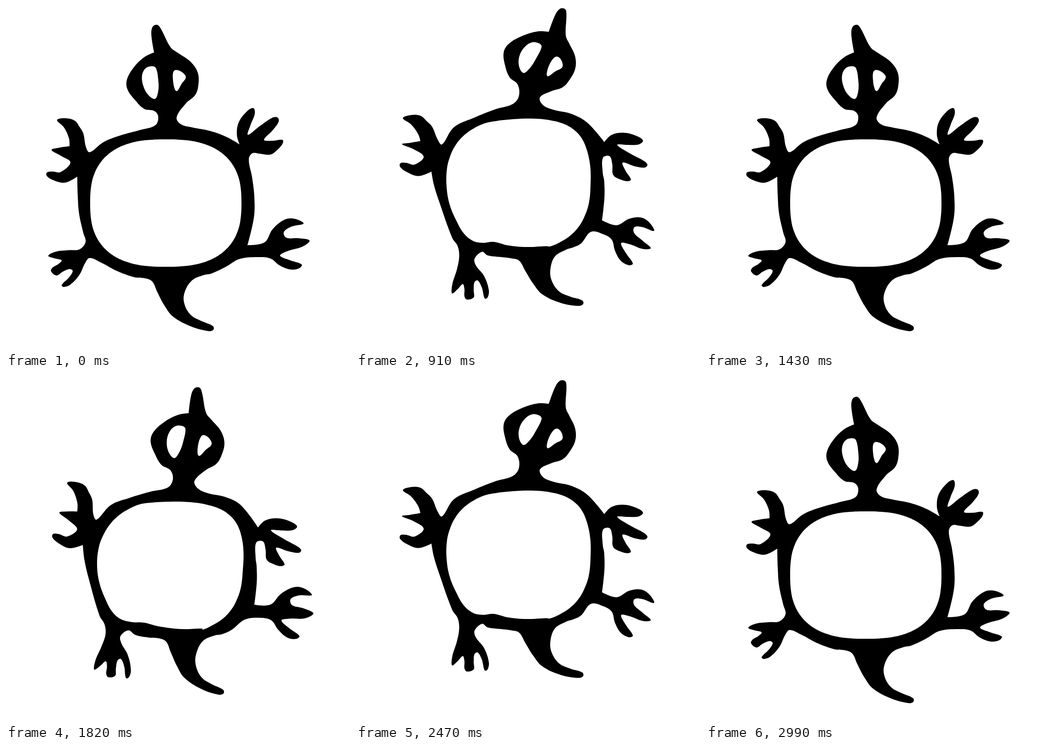
Animation of 748 by 748 pixels, one loop 3120 ms. Source, as an HTML page:

```html
<!DOCTYPE html>
<html lang="en">
<head>
<meta charset="utf-8">
<title>Turtle</title>
<style>
html, body { margin: 0; width: 100%; height: 100%; overflow: hidden; background: #fff; }
svg { display: block; width: 100vw; height: 100vh; }
</style>
</head>
<body>
<svg viewBox="0 0 748 748"><path id="turtle" fill-rule="evenodd"/></svg>
<script>
const STEP = 130, LAST = 5;

// The turtle is drawn once at rest. "a>b>c" pins a point: it moves from a to b (middle)
// and c (stretched), and the unpinned points follow. "!" marks a sharp corner.
const parse = text => text.trim().split(/\s+/).map(word => ({
  keys: word.replace('!', '').split('>').map(p => p.split(',').map(Number)),
  sharp: word.includes('!')
}));

const head = parse(`325,259>352,238>341,213 331,240 322,228 301,224>338,189>334,155 281,205 264,181
  263,160 279,132 301,111 322,101! 316,62 319,45 329,41>421,21>455,7 337,50 358,90 374,102
  401,121 417,145 418,174 411,194>457,187>449,177 391,212 371,242 380,257>417,240>406,215`);

const rightHand = parse(`508,301!>548,325>540,296 502,280 506,253 524,229 538,222>633,323>624,293
  541,234 532,258 526,280 552,261 579,243 590,242 593,251 580,270 561,291 579,293 601,291
  602,298>600,409>592,381 592,311 575,323 551,321 536,320 528,333>544,358>537,330`);

const rightFoot = parse(`525,520!>540,493>535,466 562,514 580,485 607,464 629,463
  647,473>665,472>648,489 620,480 604,492 610,504 636,505 660,510 645,523 612,533 596,543 618,553
  643,562>638,561>602,560 638,570 619,573 595,564 575,549>577,527>556,508 548,546
  508,550>520,525>511,491`);

const tail = parse(`446,582>470,557>472,525 430,585 404,597 388,624 388,648 402,672 425,685 450,696
  451,704>473,686>494,648 441,707 403,697 364,676 345,652 329,622 318,599>348,573>355,554`);

const leftFoot = parse(`182,548>249,561>258,549 172,559 160,584 141,605 126,611>267,651>286,634
  121,607 138,589 145,576 138,572 123,578 110,586 98,577 101,569 114,561 121,553 107,549
  92,543>192,634>209,625 109,534 136,531 160,529 173,513>214,535>221,522`);

const leftHand = parse(`155,371!>167,363>164,360 129,384 106,380 89,370>101,347>96,350 89,362
  101,360 119,361 140,340 120,326 99,313 116,308 138,305! 137,288 126,264
  111,248>133,228>102,244 127,244 149,249 160,263 168,277 174,307 182,318>197,308>187,301`);

const eyes = [
  '318,131 326,135 331,160 331,185 324,202 309,193 298,172 296,150 304,135',
  '370,139 383,144 391,155 382,169 372,185 367,181 363,160 364,143'
].map(parse);

// The hole in the shell is a superellipse, pinned at a few of its points.
const RING = 32;
const ringPins = {
  0: '515,417>510,389', 4: '468,526>465,500', 8: '384,546>370,524', 10: '300,532>300,513',
  12: '249,524>255,511', 16: '198,405>197,393', 20: '245,299>233,283', 24: '355,269>343,246',
  28: '487,299>475,270'
};
const bulge = v => Math.sign(v) * Math.abs(v) ** 0.78;
const shell = parse(Array.from({ length: RING }, (_, i) => {
  const a = i / RING * 2 * Math.PI;
  const x = 347.5 + 164.5 * bulge(Math.cos(a)), y = 428.5 + 138.5 * bulge(Math.sin(a));
  return `${x},${y}` + (ringPins[i] ? '>' + ringPins[i] : '');
}).join(' '));

const spin = ([x, y], a) => [x * Math.cos(a) - y * Math.sin(a), x * Math.sin(a) + y * Math.cos(a)];
const add = (p, q) => [p[0] + q[0], p[1] + q[1]];
const sub = (p, q) => [p[0] - q[0], p[1] - q[1]];
const mix = (p, q, t) => p.map((c, i) => c + (q[i] - c) * t);

// Best rigid move of one set of points onto another: both centers and the turn.
function fit(from, to, weights = from.map(() => 1)) {
  const total = weights.reduce((s, w) => s + w);
  const center = pts => [0, 1].map(k => pts.reduce((s, p, i) => s + p[k] * weights[i], 0) / total);
  const a = center(from), b = center(to);
  let dot = 0, cross = 0;
  from.forEach((p, i) => {
    const u = sub(p, a), v = sub(to[i], b);
    dot += weights[i] * (u[0] * v[0] + u[1] * v[1]);
    cross += weights[i] * (u[0] * v[1] - u[1] * v[0]);
  });
  return { a, b, turn: Math.atan2(cross, dot) };
}

const pinsOf = pts => pts.filter(p => p.keys.length > 1);

// Moves a point rigidly with the pins, the near ones counting most.
function follow(p, pins, key) {
  const rest = pins.map(pin => pin.keys[0]);
  const weights = rest.map(r => (Math.hypot(...sub(r, p)) ** 2 + 0.001) ** -2);
  const { a, b, turn } = fit(rest, pins.map(pin => pin.keys[key]), weights);
  return add(b, spin(sub(p, a), turn));
}

const rig = (pts, pins = pinsOf(pts)) => ({
  sharp: pts.map(p => p.sharp),
  poses: [0, 1, 2].map(key => pts.map(p => key ? follow(p.keys[0], pins, key) : p.keys[0]))
});

// Blends two poses of a part, turning it as a whole so that it keeps its size.
function blend(from, to, t) {
  const { a, b, turn } = fit(from, to);
  return from.map((p, i) =>
    add(mix(a, b, t), spin(mix(sub(p, a), spin(sub(to[i], b), -turn), t), turn * t)));
}

const posed = ({ poses }, n) => n <= 2
  ? blend(poses[0], poses[1], n / 2)
  : blend(poses[1], poses[2], (n - 2) / 2);

// Stretches of the shell's edge follow the hole and the joints of the limbs.
const limbs = [head, rightHand, rightFoot, tail, leftFoot, leftHand];
const joints = limbs.flatMap(limb => [limb[0], limb[limb.length - 1]]);
const edges = [
  '405,264 445,272 480,285>510,276>502,253',
  '535,372 540,415 539,460',
  '478,567',
  '302,592 280,590 243,577 207,558',
  '168,493 159,452 156,412',
  '212,296 247,282 290,270'
].map(parse);
const frame = [...pinsOf(shell), ...joints, ...edges.flatMap(pinsOf)];

const loops = [
  limbs.flatMap((limb, i) => [rig(limb), rig(edges[i], frame)]),
  [rig(shell)],
  ...eyes.map(eye => [rig(eye, pinsOf(head))])
];

// Closed smooth curve; handles shorten where the line turns and vanish at corners.
function curve(pts, sharp) {
  const n = pts.length, at = i => pts[(i + n) % n];
  const handle = (i, side) => {
    const p = at(i - 1), q = at(i), r = at(i + 1);
    if (sharp[i % n]) return q;
    const before = Math.hypot(...sub(q, p)), after = Math.hypot(...sub(r, q));
    const k = 0.37 * side * (side > 0 ? after : before) / (before + after);
    return add(q, sub(r, p).map(c => c * k));
  };
  const show = p => p.map(c => c.toFixed(2)).join(' ');
  return 'M' + show(pts[0]) + pts.map((_, i) =>
    'C' + [handle(i, 1), handle(i + 1, -1), at(i + 1)].map(show).join(' ')).join('') + 'Z';
}

const pictures = Array.from({ length: LAST + 1 }, (_, n) => loops.map(parts =>
  curve(parts.flatMap(p => posed(p, n)), parts.flatMap(p => p.sharp))).join(''));

const turtle = document.getElementById('turtle');
const start = performance.now();
let shown = -1;

function draw() {
  const count = 2 * LAST + 2;
  const step = Math.floor((performance.now() - start) / STEP) % count;
  const n = Math.min(step, count - 1 - step);
  if (n !== shown) turtle.setAttribute('d', pictures[shown = n]);
  requestAnimationFrame(draw);
}
draw();
</script>
</body>
</html>
```
